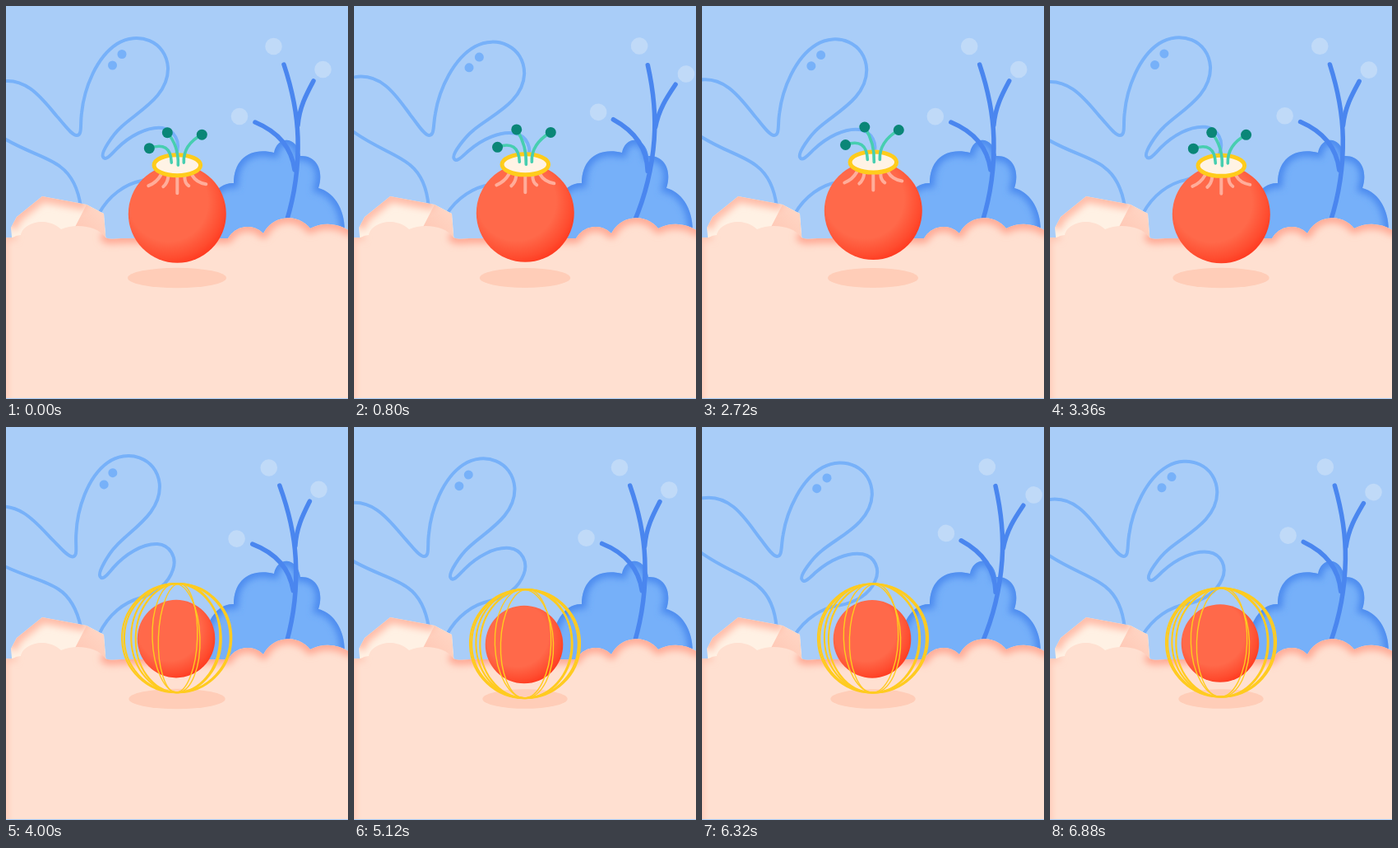
Animation, 416 px wide and 477 px high, one loop 6960 ms. Source, as an HTML page:

```html
<!DOCTYPE html>
<html lang="en">
<head>
<meta charset="utf-8">
<title>Floating fruit</title>
<style>
html, body { margin: 0; width: 100%; height: 100%; overflow: hidden; background: #a9cdf8; }
svg { display: block; width: 416px; height: 477px; }
.line { fill: none; stroke-linecap: round; stroke-linejoin: round; }
</style>
</head>
<body>
<svg viewBox="0 0 416 477">
  <defs>
    <radialGradient id="red" cx=".41" cy=".38" r=".65">
      <stop offset=".62" stop-color="#ff694a"/>
      <stop offset=".88" stop-color="#ff4c2f"/>
      <stop offset="1" stop-color="#ff3a20"/>
    </radialGradient>
    <linearGradient id="side" x1="0" y1="1" x2="1" y2="0">
      <stop offset="0" stop-color="#ffc0ac"/>
      <stop offset="1" stop-color="#ffd9c8"/>
    </linearGradient>
    <filter id="soft" filterUnits="userSpaceOnUse" x="-20" y="130" width="456" height="367">
      <feGaussianBlur stdDeviation="4"/>
    </filter>
    <path id="bushShape" d="M236 300C236 240 255 214 277 215C277 185 298 171 326 178C330 157 354 157 358 182C378 181 387 200 380 221C400 226 416 250 411 285V300Z"/>
    <path id="groundShape" d="M0 281H8Q13 278 18 278C20 264 48 254 67 271C85 263 112 267 121 281Q126 284 140 282H270A27 27 0 0 1 313 276A34 34 0 0 1 370 270A47 47 0 0 1 418 273V476H0Z"/>
    <clipPath id="bushClip"><use href="#bushShape"/></clipPath>
    <clipPath id="groundClip"><use href="#groundShape"/></clipPath>
    <clipPath id="rockClip"><path d="M6 269L13 256L44 231L98 241L119 252L122 290H8Z"/></clipPath>
  </defs>

  <rect width="416" height="477" fill="#a9cdf8"/>

  <g id="plant">
    <g class="line" stroke="#77b1f9" stroke-width="4">
      <path d="M-8 92C25 85 45 114 62 134C72 145 80 157 86 157C93 157 90 145 92 130C95 100 110 62 135 46C160 30 195 42 197 75C198 110 160 128 140 147C130 156 115 178 118 183C121 189 128 180 135 173C150 158 172 146 190 148C205 150 213 165 207 180C200 198 185 207 165 212C145 216 125 230 113 252"/>
      <path d="M-10 156C20 176 50 182 66 195C81 206 88 223 91 244"/>
    </g>
    <g fill="#77b1f9"><circle cx="141" cy="58.5" r="5.5"/><circle cx="129.5" cy="72" r="5.5"/></g>
  </g>

  <use href="#bushShape" fill="#76b0f9"/>
  <g clip-path="url(#bushClip)">
    <use href="#bushShape" fill="none" stroke="#4a88ee" stroke-width="11" filter="url(#soft)"/>
  </g>

  <g id="stalk">
    <g class="line" stroke="#4a86ef" stroke-width="5.5">
      <path d="M338 71C346 95 354 125 355 160C356 195 351 230 341 262"/>
      <path d="M374 91C366 106 357 122 355 145"/>
      <path d="M303 141C327 151 347 168 351 199"/>
    </g>
    <g fill="#c0daf8">
      <circle cx="325.5" cy="49" r="10.3"/><circle cx="385.5" cy="77" r="10.3"/><circle cx="284" cy="134" r="10.3"/>
    </g>
  </g>

  <g clip-path="url(#rockClip)">
    <rect y="225" width="130" height="70" fill="#fff1e4"/>
    <path d="M98 241L119 252L122 290H70L82 272Z" fill="url(#side)"/>
    <path d="M6 269L13 256L44 231L98 241" fill="none" stroke="#ffbca8" stroke-width="14" filter="url(#soft)"/>
  </g>

  <use href="#groundShape" fill="#ffe0d1"/>
  <g clip-path="url(#groundClip)">
    <path class="line" d="M121 281Q126 284 140 282H270A27 27 0 0 1 313 276A34 34 0 0 1 370 270A47 47 0 0 1 418 273" stroke="#ffa994" stroke-width="12" filter="url(#soft)"/>
    <path class="line" d="M-2 480V281H10" stroke="#ffbeaa" stroke-width="6" filter="url(#soft)"/>
  </g>

  <ellipse id="shadow" cx="208" cy="330" fill="#ffcdb8"/>

  <g id="fruit">
    <circle r="59.5" fill="url(#red)"/>
    <path class="line" d="M-20 -47Q-25 -38 -35 -34M-11 -45Q-12 -37 -17 -33M0 -44V-25M9 -45Q9 -37 14 -34M18 -47Q23 -38 35 -36" stroke="#ffad9a" stroke-width="4"/>
    <ellipse cy="-59" rx="28.3" ry="12.5" fill="#fff3e5" stroke="#ffcc1c" stroke-width="5"/>
    <g id="stems"></g>
  </g>

  <circle id="seed" cx="207" r="47.3" fill="url(#red)"/>
  <g id="cage" class="line" stroke="#ffcb20"></g>
</svg>
<script>
const LOOP = 6960, STEP = 80, POP = 3600, SWAY = 5200;
const { sin, cos, asin, floor, PI } = Math;
const TAU = 2 * PI;
const $ = id => document.getElementById(id);
const wave = (t, period) => cos(TAU * t / period);
const degrees = rad => rad * 180 / PI;

function set(el, attrs) {
  for (const key in attrs) el.setAttribute(key, attrs[key]);
}

function make(tag, parent, attrs) {
  const el = document.createElementNS("http://www.w3.org/2000/svg", tag);
  set(el, attrs);
  return parent.appendChild(el);
}

// Smooth 0..1 ramp
function ease(t, from, length) {
  const u = Math.min(Math.max((t - from) / length, 0), 1);
  return u * u * (3 - 2 * u);
}

const stems = [
  { root: [-7, -62], bend: [-8, -89], tip: [-34, -79.5], lift: 0.5 },
  { root: [1, -59], bend: [2, -82], tip: [-12, -98.5], lift: 3 },
  { root: [8, -62], bend: [7, -84], tip: [30, -96], lift: 2 }
];
for (const s of stems) s.line = make("path", $("stems"), { class: "line", stroke: "#47ceb0", "stroke-width": 3.6 });
for (const s of stems) s.knob = make("circle", $("stems"), { r: 6.5, fill: "#0a8677" });

// Three rings 30 degrees apart, each drawn twice by a loose hand
const hoops = Array.from({ length: 6 }, (_, i) => ({
  angle: 30 * floor(i / 2) + 5 * (i % 2),
  lean: i % 2 ? 1 : -1,
  el: make("ellipse", $("cage"), { "stroke-width": i < 4 ? 2.2 : 1.4 })
}));

function drawSway(t) {
  const a = TAU * t / SWAY;
  const plant = 1 + 10 * sin(a) - 2 * cos(a) + 4 * sin(2 * a) + cos(2 * a);
  const stalk = 3 + 10 * sin(a) + 0.5 * cos(a) + 7 * sin(2 * a) - 3.5 * cos(2 * a);
  set($("plant"), { transform: `rotate(${degrees(asin(plant / 182))} 90 240)` });
  set($("stalk"), { transform: `rotate(${degrees(asin(stalk / 189))} 341 260)` });
}

function drawShadow(t) {
  const pulse = 57.5 + 2.5 * wave(t, 1840);
  const rx = pulse + (51.7 - pulse) * ease(t, 4000, 400);
  set($("shadow"), { rx, ry: 9 + rx * 0.055 });
}

function drawFruit(t) {
  const y = 248.6 + 4.5 * wave(t - 330, 3200);
  const size = 1 - 0.2 * ease(t, POP - 160, 160);
  set($("fruit"), { transform: `translate(208.3 ${y}) scale(${size})` });
  const up = (1 - wave(t, 1840)) / 2;
  for (const { root, bend, tip, lift, line, knob } of stems) {
    const cx = tip[0] + up * lift / 2, cy = tip[1] - up * lift;
    set(line, { d: `M${root}Q${bend} ${cx} ${cy}` });
    set(knob, { cx, cy });
  }
}

function drawCage(t) {
  const y = 260.5 + 3.5 * wave(t - 5120, 2080);
  const radius = 66 * (3 - 2 * ease(t, POP, 320));
  const turn = 4 * wave(t - 4000, 1760);
  set($("seed"), { cy: y });
  for (const { el, angle, lean } of hoops) {
    set(el, {
      cx: 208 + lean, cy: y - 1,
      rx: radius * cos((angle + turn) * PI / 180), ry: radius,
      transform: `rotate(${2 * lean} 208 ${y})`
    });
  }
}

function draw(t) {
  const popped = t >= POP;
  $("fruit").style.display = popped ? "none" : "";
  $("seed").style.display = $("cage").style.display = popped ? "" : "none";
  drawSway(t);
  drawShadow(t);
  (popped ? drawCage : drawFruit)(t);
}

const start = performance.now();
function tick() {
  const t = (performance.now() - start) % LOOP;
  draw(floor(t / STEP) * STEP);
  requestAnimationFrame(tick);
}
draw(0);
requestAnimationFrame(tick);
</script>
</body>
</html>
```
